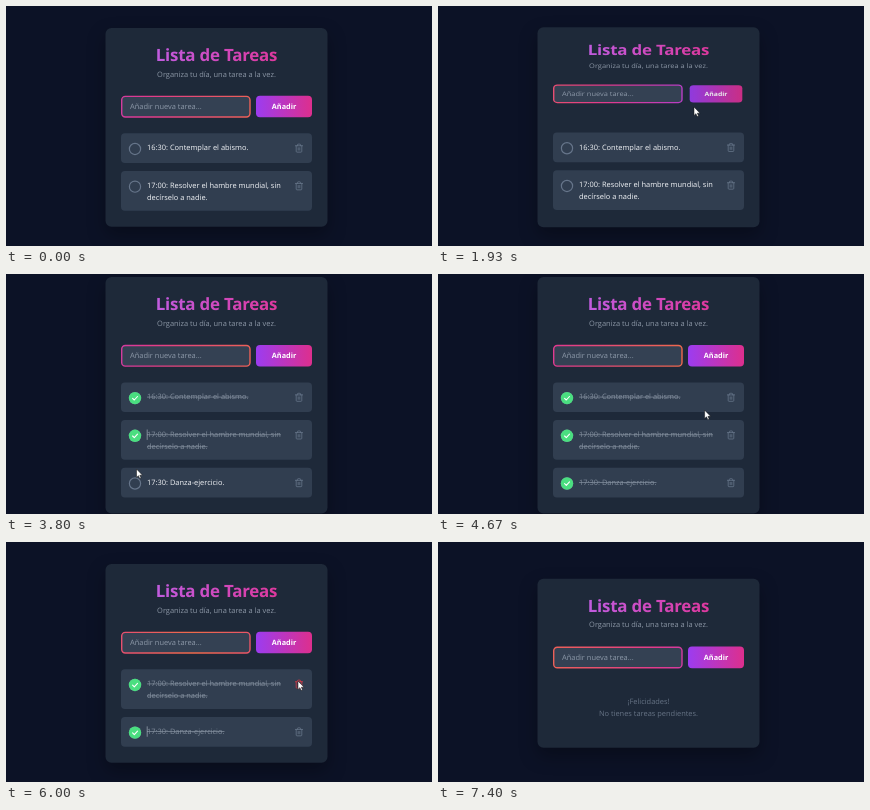
An HTML page for the animation above (7470 ms loop, 426 px wide and 240 px high).

```html
<!DOCTYPE html>
<html lang="es">
<head>
<meta charset="utf-8">
<title>Lista de Tareas</title>
<style>
  html, body { margin: 0; width: 100%; height: 100%; overflow: hidden; background: #0c1226; }
  svg { display: block; width: 426px; height: 240px; }
  text { font: 400 7.45px "Open Sans", "Noto Sans", sans-serif; text-rendering: geometricPrecision; white-space: pre; }
  .mid { text-anchor: middle; }
  .title { font-size: 16.9px; font-weight: 700; letter-spacing: -.2px; }
  .bold { font-size: 7.3px; font-weight: 700; fill: #fff; }
  .line { fill: none; stroke-linecap: round; stroke-linejoin: round; }
  .done { text-decoration: line-through; }
  #back { filter: drop-shadow(0 8px 9px rgba(0, 0, 0, .3)); }
</style>
</head>
<body>
<svg viewBox="0 0 426 240">
  <defs>
    <linearGradient id="titleFill" gradientUnits="userSpaceOnUse" x1="115" x2="306" y1="0" y2="0">
      <stop stop-color="#b866f2"/><stop offset="1" stop-color="#e62e8b"/>
    </linearGradient>
    <linearGradient id="buttonFill">
      <stop stop-color="#9c3cf0"/><stop offset="1" stop-color="#dd2f8d"/>
    </linearGradient>
    <linearGradient id="edge" gradientUnits="userSpaceOnUse" x1="0" x2="516" y1="0" y2="0" spreadMethod="repeat">
      <stop stop-color="#9d40ea"/><stop offset=".25" stop-color="#e23a8c"/>
      <stop offset=".5" stop-color="#ef6a4a"/><stop offset=".75" stop-color="#e23a8c"/>
      <stop offset="1" stop-color="#9d40ea"/>
    </linearGradient>
  </defs>

  <rect id="back" x="99.5" width="222" rx="6" fill="#1e2939"/>

  <g id="content">
    <text class="mid title" x="210.5" y="33" fill="url(#titleFill)">Lista de Tareas</text>
    <text class="mid" x="210.5" y="48.6" fill="#8c97a6">Organiza tu día, una tarea a la vez.</text>
    <rect x="115.7" y="68.4" width="128.3" height="20.6" rx="3.6" fill="#344153" stroke="url(#edge)" stroke-width="1.4"/>
    <text id="field" x="124" y="81.3"></text>
    <path id="fieldCaret" d="M0 74v9.5" stroke="#e5e7eb" stroke-width=".6"/>
    <g id="button">
      <rect x="250" y="67.8" width="56" height="21.6" rx="4" fill="url(#buttonFill)"/>
      <text id="label" class="mid bold" x="278" y="81.3">Añadir</text>
      <path id="tick" class="line" d="M274.6 79l2.3 2.3 4.6-4.6" stroke="#fff" stroke-width="1.4"/>
    </g>
    <g id="empty" fill="#667385">
      <text class="mid" x="210.5" y="125.7">¡Felicidades!</text>
      <text class="mid" x="210.5" y="137.7">No tienes tareas pendientes.</text>
    </g>
  </g>

  <g id="items"></g>

  <g id="cursor" fill="#fff" stroke="#111" stroke-width=".5" stroke-linejoin="round">
    <path id="arrow" d="M0 0V8.4L1.9 6.7 3.2 9.6 4.6 9 3.3 6.2H6Z"/>
    <path id="hand" d="M-1 1a1 1 0 0 1 2 0v3l3.4.8q1.2.4 1 1.6l-.5 3q-.2 1-1.2 1H-.2L-3.4 6.9q-.4-1 .5-1.3l1.9 1Z"/>
    <path id="beam" d="M-1.4-4.5h2.8M0-4.5v9M-1.4 4.5h2.8" stroke="#fff" stroke-width=".8"/>
  </g>
</svg>

<script>
const LOOP = 7470, MID = 121.3, LIST_TOP = 105.3, GAP = 8, PAD = 16;
const MOVE = 450, FADE = 250;
const $ = id => document.getElementById(id);
const set = (el, attrs) => { for (const k in attrs) el.setAttribute(k, attrs[k]); };
const clamp = v => Math.max(0, Math.min(1, v));
const lerp = (a, b, p) => a + (b - a) * p;
const ramp = (t, from, length) => clamp((t - from) / length);
const smooth = p => p * p * (3 - 2 * p);
const within = (t, [a, b]) => t >= a && t < b;

const tasks = [
  { lines: ['16:30: Contemplar el abismo.'], h: 29.7, check: 2890, carets: [[2900, 3430]] },
  { lines: ['17:00: Resolver el hambre mundial, sin', 'decírselo a nadie.'], h: 39.7, check: 3450, carets: [[3450, 3980]] },
  { lines: ['17:30: Danza-ejercicio.'], h: 29.7, check: 4100, carets: [[4100, 4630], [5690, 6220]] },
];

// Which tasks are listed from each moment on
const phases = [
  [0, [0, 1]], [1880, [0, 1, 2]], [5230, [1, 2]], [6300, [2]], [6850, []],
].map(([at, ids]) => {
  const sum = ids.reduce((s, i) => s + tasks[i].h + GAP, -GAP);
  const height = ids.length ? LIST_TOP + sum + PAD : 169;
  const top = MID - height / 2, tops = {};
  let y = top + LIST_TOP;
  for (const i of ids) { tops[i] = y; y += tasks[i].h + GAP; }
  return { at, height, top, tops };
});

// Cursor tip: time, x, y
const path = [
  [70, 359, 184], [700, 200, 101], [1430, 200, 101], [1740, 256, 101], [2050, 256, 101],
  [2680, 129, 119.5], [3080, 129, 119.5], [3330, 129, 158], [3620, 129, 158], [3800, 130.5, 195],
  [3950, 129, 206], [4220, 129, 206], [4830, 294.5, 122], [5600, 294.5, 122], [5920, 292, 139],
  [6230, 292, 139], [6520, 293, 164], [6700, 293, 164], [7180, 348, 229],
];
const edgeTrack = [[0, .2], [1930, .65], [2870, .76], [3800, 1.2], [5330, 1.27], [7470, 1.56]];
const typed = tasks[2].lines[0], TYPE_FROM = 850, TYPE_STEP = 25, ADDED = 1870;

// cubic-bezier(.4, 0, .1, 1)
function ease(x) {
  let lo = 0, hi = 1, s = .5;
  for (let i = 0; i < 20; i++) {
    s = (lo + hi) / 2;
    const v = 1.2 * (1 - s) ** 2 * s + .3 * (1 - s) * s * s + s ** 3;
    if (v < x) lo = s; else hi = s;
  }
  return 3 * (1 - s) * s * s + s ** 3;
}

function follow(track, t, curve = p => p) {
  if (t <= track[0][0]) return track[0].slice(1);
  for (let i = 1; i < track.length; i++) {
    const a = track[i - 1], b = track[i];
    if (t < b[0]) return a.slice(1).map((v, k) => lerp(v, b[k + 1], curve((t - a[0]) / (b[0] - a[0]))));
  }
  return track[track.length - 1].slice(1);
}

const TRASH = 'M3 6h18M19 6v14a2 2 0 0 1-2 2H7a2 2 0 0 1-2-2V6m3 0V4a2 2 0 0 1 2-2h4a2 2 0 0 1 2 2v2M10 11v6M14 11v6';
$('items').innerHTML = tasks.map(task => `
  <g>
    <rect x="115" width="191" height="${task.h}" rx="4" fill="#313e50"/>
    <circle cx="129" cy="15.7" r="5.6" fill="none" stroke="#66758a" stroke-width="1.2"/>
    <g class="mark">
      <circle r="6.2" fill="#4ade80"/>
      <path class="line" d="M-2.4.2l1.7 1.7L2.5-1.6" stroke="#fff" stroke-width="1.1"/>
    </g>
    ${task.lines.map((s, i) => `<text x="141" y="${17 + i * 12}">${s}</text>`).join('')}
    <path class="caret" d="M141.2 9.4v10.4" stroke="#b6bfca" stroke-width=".6"/>
    <path class="trash line" d="${TRASH}" transform="translate(288.2 10.1) scale(.4)" stroke-width="2"/>
  </g>`).join('');
const nodes = [...$('items').children];

function drawItem(i, t, prev, next, p, mouse) {
  const task = tasks[i], node = nodes[i];
  const was = prev.tops[i], will = next.tops[i];
  const shown = will !== undefined;
  node.style.display = shown ? '' : 'none';
  if (!shown) return null;

  let y = was === undefined ? will : lerp(was, will, p);
  let alpha = 1;
  if (i === 2) {
    const enter = smooth(ramp(t, 1930, 320));
    alpha = enter;
    y += 8 * (1 - enter);
  }
  const after = phases[phases.indexOf(next) + 1];
  if (after && !(i in after.tops)) alpha *= 1 - ramp(t, after.at - FADE, FADE);
  set(node, { transform: `translate(0 ${y})`, opacity: alpha });

  const mark = smooth(ramp(t, task.check, 200)), dim = ramp(t, task.check, 300);
  set(node.querySelector('.mark'), { transform: `translate(129 15.7) scale(${mark})` });
  const shade = [[244, 130], [246, 142], [249, 157]].map(([a, b]) => Math.round(lerp(a, b, dim)));
  node.querySelectorAll('text').forEach(el => {
    el.style.fill = `rgb(${shade})`;
    el.classList.toggle('done', t >= task.check);
  });
  set(node.querySelector('.caret'), { opacity: task.carets.some(w => within(t, w)) ? 1 : 0 });

  const hot = mouse && Math.abs(mouse[0] - 293) < 5 && Math.abs(mouse[1] - y - 15) < 6;
  set(node.querySelector('.trash'), { stroke: hot ? '#d63c4a' : '#66758a' });
  return y;
}

function draw(t) {
  let n = phases.length - 1;
  while (phases[n].at > t) n--;
  const next = phases[n], prev = phases[Math.max(0, n - 1)];
  const p = n ? ease(ramp(t, next.at, MOVE)) : 1;
  const top = lerp(prev.top, next.top, p), height = lerp(prev.height, next.height, p);
  const squash = height / next.height;
  set($('back'), { y: top, height });
  set($('content'), { transform: `translate(0 ${top}) scale(1 ${squash})` });

  const [shift] = follow(edgeTrack, t);
  set($('edge'), { gradientTransform: `translate(${115 - shift * 516} 0)` });

  const count = t < ADDED ? Math.floor(clamp((t - TYPE_FROM) / (TYPE_STEP * typed.length)) * typed.length) : 0;
  const field = $('field');
  field.textContent = count ? typed.slice(0, count) : 'Añadir nueva tarea...';
  set(field, { fill: count ? '#f3f5f8' : '#8d99a9' });
  const focus = within(t, [740, 1800]) && (t < 1450 || t < 1700);
  set($('fieldCaret'), {
    opacity: focus ? 1 : 0,
    transform: `translate(${124.3 + (count ? field.getComputedTextLength() : 0)} 0)`,
  });

  const tap = smooth(ramp(t, 1800, 70)) - smooth(ramp(t, 1950, 110));
  const size = 1 - .06 * tap;
  set($('button'), {
    transform: `translate(278 78.6) scale(${size}) translate(-278 -78.6)`,
    opacity: 1 - .1 * tap,
  });
  const swap = ramp(t, 1960, 120) - ramp(t, 3250, 120);
  set($('label'), { opacity: clamp(1 - 2 * swap) });
  set($('tick'), { opacity: clamp(2 * swap - 1) });
  set($('empty'), { opacity: ramp(t, 6930, 330) });

  const mouse = within(t, [70, 7230]) ? follow(path, t, smooth) : null;
  const tops = tasks.map((_, i) => drawItem(i, t, prev, next, p, mouse));

  $('cursor').style.display = mouse ? '' : 'none';
  if (!mouse) return;
  const [x, y] = mouse;
  const row = y > top + 68 * squash && y < top + 89 * squash;
  const onCheck = tops.some(v => v !== null && Math.hypot(x - 129, y - v - 15.7) < 7);
  const kind = onCheck || (row && x > 250 && x < 306) ? 'hand' : row && x > 115 && x < 244 ? 'beam' : 'arrow';
  for (const id of ['arrow', 'hand', 'beam']) $(id).style.display = id === kind ? '' : 'none';
  set($('cursor'), { transform: `translate(${x} ${y})` });
}

const start = performance.now();
function tick() {
  draw((performance.now() - start) % LOOP);
  requestAnimationFrame(tick);
}
tick();
</script>
</body>
</html>
```
